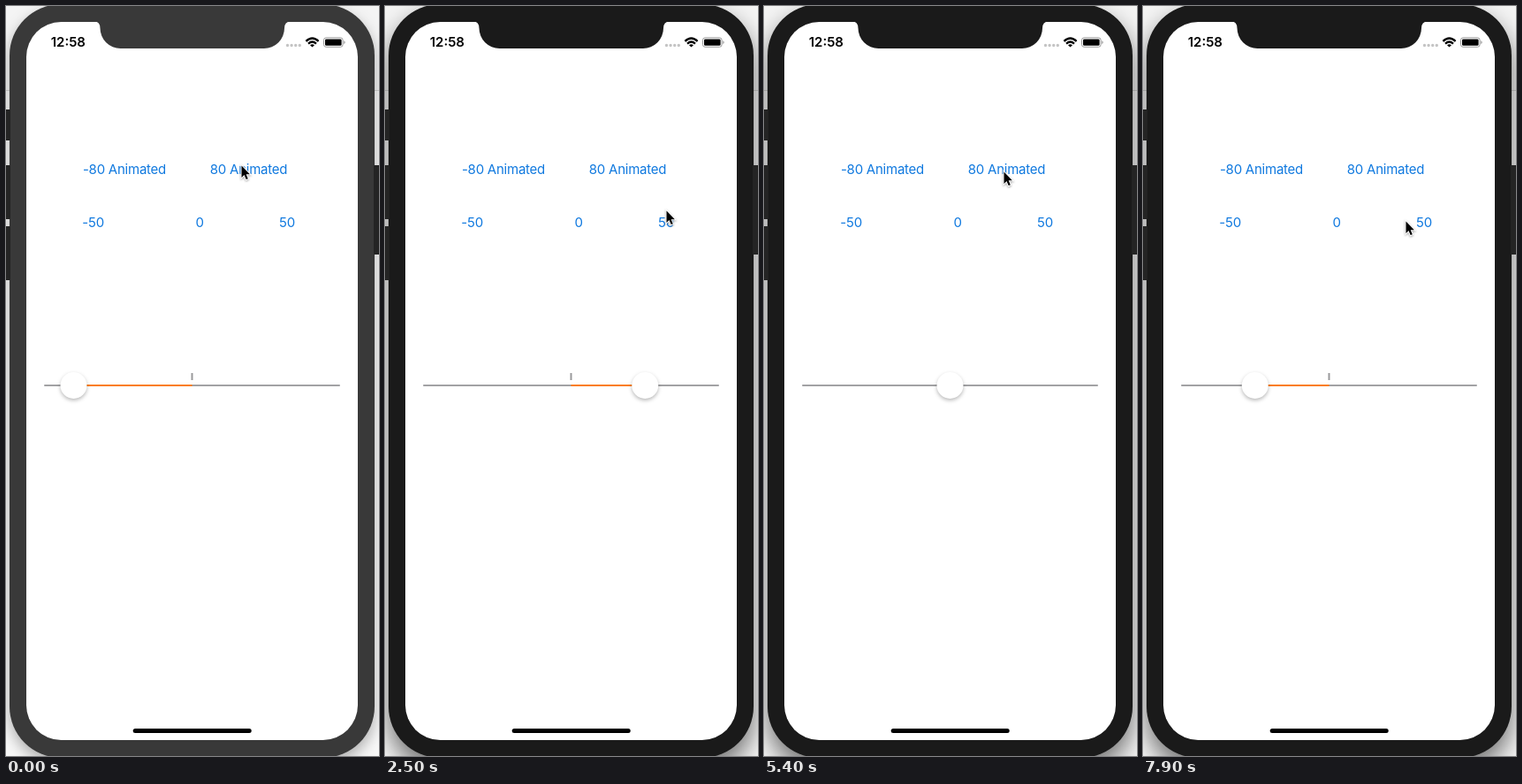
Write an HTML page that moves like this. It is 422 by 848 pixels and loops after 8 s.

```html
<!DOCTYPE html>
<html lang="en">
<head>
<meta charset="utf-8">
<title>Centered slider</title>
<style>
  html, body { margin: 0; width: 100%; height: 100%; overflow: hidden; background: #f6f6f6; }
  svg { display: block; width: 422px; height: 848px; }
  text { font: 15px Inter, Roboto, sans-serif; }
  #clock { font-weight: 600; }
  #buttons { fill: #1079df; text-anchor: middle; letter-spacing: -.24px; }
  #stage { --case: #1a1a1a; }
  #stage.idle { --case: #393939; }
  #notch { fill: var(--case); }
  #body { fill: var(--case); filter: drop-shadow(0 14px 14px rgba(0,0,0,.55)); }
  .idle #body { filter: drop-shadow(0 7px 8px rgba(0,0,0,.3)); }
  #thumb { fill: #fff; filter: drop-shadow(0 2px 2px rgba(0,0,0,.28)); }
  #cursor { filter: drop-shadow(0 1px 1px rgba(0,0,0,.35)); }
</style>
</head>
<body>
<svg id="stage" viewBox="0 0 422 848">
  <rect width="422" height="95" fill="#f4f4f4"/>
  <rect y="95" width="422" height="1" fill="#d4d4d4"/>
  <rect y="96" width="422" height="752" fill="#f8f8f8"/>
  <rect id="body" x="4" y="-2" width="413" height="852" rx="58"/>
  <g fill="#242424">
    <rect x="-5" y="117" width="10" height="35" rx="1"/>
    <rect x="-5" y="180" width="10" height="61" rx="1"/>
    <rect x="-5" y="249" width="10" height="61" rx="1"/>
    <rect x="416" y="180" width="10" height="101" rx="1"/>
  </g>
  <rect x="23" y="18" width="375" height="812" rx="39.5" fill="#fff"/>
  <path id="notch" d="M100 17Q106.5 18 106.5 25A23 23 0 0 0 129.5 48H292A23 23 0 0 0 315 25Q315 18 322 17Z"/>

  <text id="clock" x="50.7" y="46.3">12:58</text>
  <path d="M318.5 44.5h14" stroke="#c4c4c4" stroke-width="3.4" stroke-linecap="round" stroke-dasharray="0 4.6"/>
  <path d="M339.4 39.9Q346.5 33.1 353.6 39.9M342 42.6Q346.5 38.4 351 42.6" fill="none" stroke="#000" stroke-width="2.2"/>
  <path d="M346.5 46.6L344 44.2Q346.5 42.2 349 44.2Z"/>
  <rect x="359.5" y="35.9" width="21.6" height="10.4" rx="2.6" fill="none" stroke="#999"/>
  <rect x="361" y="37.4" width="18.6" height="7.4" rx="1.4"/>
  <path d="M382.3 39.2q1.4 .6 1.4 1.9t-1.4 1.9z" fill="#999"/>

  <g id="buttons">
    <text x="134" y="189.5">-80 Animated</text>
    <text x="274.5" y="189.5">80 Animated</text>
    <text x="98.6" y="249.5">-50</text>
    <text x="219" y="249.5">0</text>
    <text x="318" y="249.5">50</text>
  </g>
  <rect x="43" y="428" width="335" height="2" rx="1" fill="#a2a2a4"/>
  <rect x="209.5" y="415" width="2" height="8" fill="#99999b"/>
  <rect id="fill" y="428" height="2" fill="#fb7d16"/>
  <circle id="thumb" cy="429" r="15"/>
  <rect x="143.7" y="817" width="134" height="5" rx="2.5"/>
  <path id="cursor" d="M0 0V13.4L3 10.6L5.2 15.6L7.3 14.7L5.2 9.7H9.4Z" stroke="#fff" stroke-width="2" paint-order="stroke"/>
</svg>
<script>
const $ = id => document.getElementById(id);
const LOOP = 8000, STEP = 100, ACTIVATE = 600;
const HOLD = 100, FADE = 400, SLIDE = 300;
const CENTER = 210.5, UNIT = 1.675;
const buttons = [...$('buttons').children];

// press time, button, pointer tip; the last stop presses nothing before the loop ends
const taps = [
  [700, 1, 266.5, 180.5], [1700, 4, 318.5, 231.5], [3000, 3, 218, 238],
  [3600, 0, 149, 186], [4200, 2, 98.5, 242.5], [4900, 3, 218, 243],
  [5500, 1, 271.5, 187.5], [6100, 4, 318, 236], [6900, 0, 126.5, 175.5],
  [7400, 2, 97, 247], [LOOP, 4, 297.5, 243.5]
];

const clamp = v => Math.max(0, Math.min(1, v));
const smooth = v => v * v * (3 - 2 * v);
const mix = (a, b, k) => a + (b - a) * k;

// The pointer rests after a press, then travels to arrive shortly before the next.
function pointer(t) {
  let [last, , x, y] = taps[0];
  for (const [press, , toX, toY] of taps) {
    const leave = Math.max(last + 200, press - 500), arrive = press - 100;
    const k = smooth(clamp((t - leave) / (arrive - leave)));
    x = mix(x, toX, k);
    y = mix(y, toY, k);
    last = press;
  }
  return [x, y];
}

function draw(t) {
  let value = -80;
  const alpha = buttons.map(() => 1);
  for (const [press, i] of taps) {
    if (t < press) break;
    const since = t - press - HOLD, label = buttons[i].textContent;
    alpha[i] = mix(.2, 1, Math.sin(clamp(since / FADE) * Math.PI / 2));
    const k = label.includes('Animated') ? smooth(clamp(since / SLIDE)) : +(since >= 0);
    value = mix(value, parseInt(label), k);
  }
  buttons.forEach((b, i) => b.setAttribute('opacity', alpha[i]));

  const x = CENTER + value * UNIT;
  $('thumb').setAttribute('cx', x);
  $('fill').setAttribute('x', Math.min(x, CENTER));
  $('fill').setAttribute('width', Math.abs(x - CENTER));
  $('cursor').setAttribute('transform', `translate(${pointer(t)})`);
  $('stage').classList.toggle('idle', t < ACTIVATE);
}

const start = performance.now();
function frame() {
  const t = (performance.now() - start) % LOOP;
  draw(Math.floor(t / STEP) * STEP);
  requestAnimationFrame(frame);
}
frame();
</script>
</body>
</html>
```
